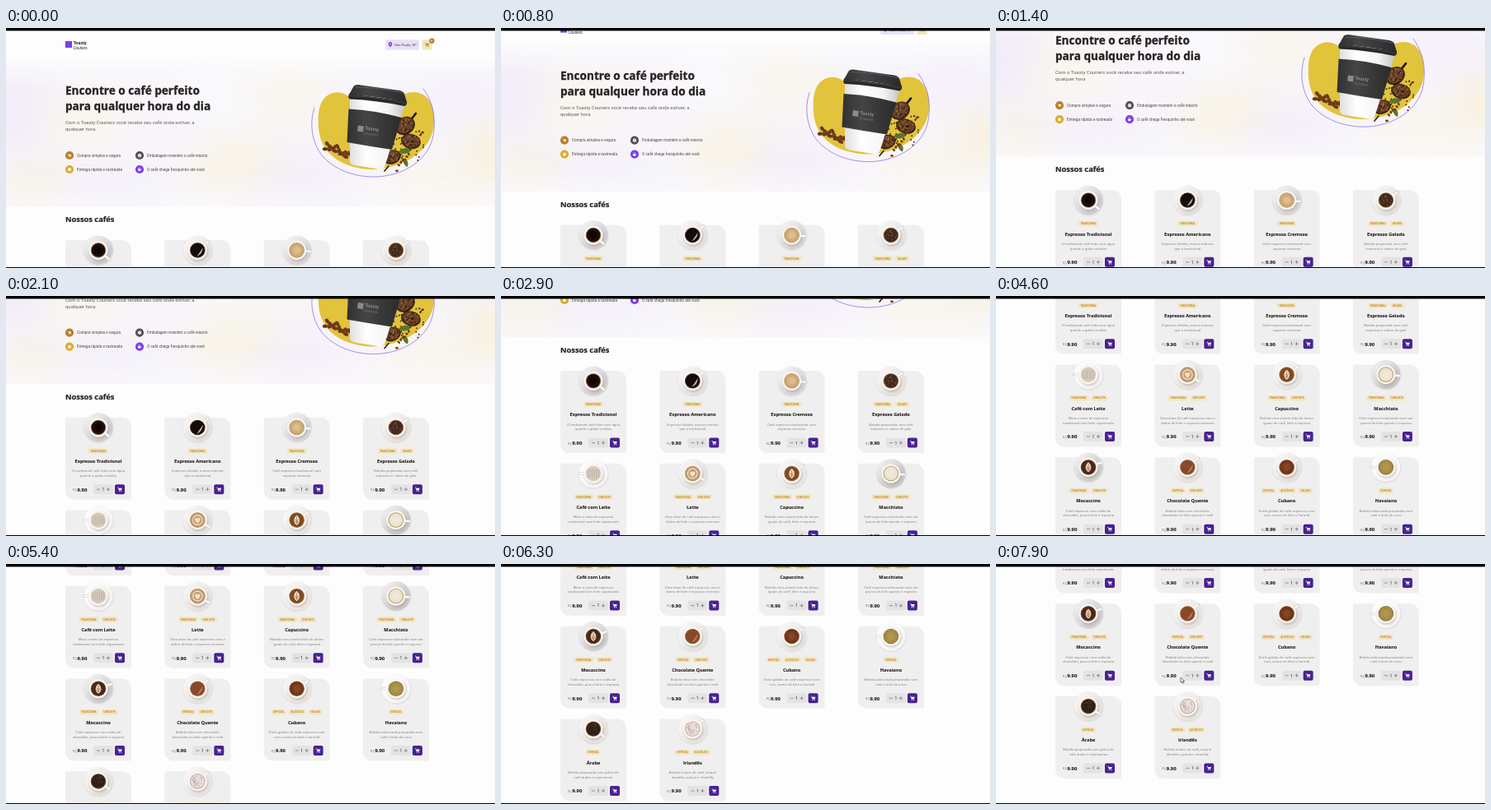
These frames come from a looping animation (593x292 px, 8000 ms). An HTML page:

```html
<!DOCTYPE html>
<html lang="pt-BR">
<head>
<meta charset="utf-8">
<style>
html, body { margin: 0; width: 100%; height: 100%; overflow: hidden; background: #fdfdfd; }
svg { display: block; width: 100vw; height: 100vh; }
text { font-family: Roboto, sans-serif; }
.h { font-family: "Open Sans", "Noto Sans", sans-serif; font-weight: 700; stroke: #272221; stroke-width: .022em; stroke-linejoin: round; }
.b { font-weight: 700; }
.m { text-anchor: middle; }
</style>
</head>
<body>
<svg id="stage" viewBox="0 0 593 292">
  <defs>
    <filter id="soft" x="-50%" y="-50%" width="200%" height="200%"><feGaussianBlur stdDeviation="22"/></filter>
    <filter id="shade" x="-50%" y="-50%" width="200%" height="200%"><feGaussianBlur stdDeviation="1"/></filter>
    <clipPath id="heroBox"><rect y="38" width="593" height="179"/></clipPath>
    <linearGradient id="fade" x2="0" y2="1">
      <stop offset="0" stop-color="#fdfdfd" stop-opacity=".7"/><stop offset=".2" stop-color="#fdfdfd" stop-opacity="0"/>
      <stop offset=".75" stop-color="#fdfdfd" stop-opacity="0"/><stop offset="1" stop-color="#fdfdfd" stop-opacity=".4"/>
    </linearGradient>
    <linearGradient id="paper">
      <stop offset="0" stop-color="#dfdfe0"/><stop offset=".3" stop-color="#fff"/>
      <stop offset=".7" stop-color="#f4f4f5"/><stop offset="1" stop-color="#c4c3c4"/>
    </linearGradient>
    <linearGradient id="dark">
      <stop offset="0" stop-color="#313132"/><stop offset=".35" stop-color="#454546"/><stop offset="1" stop-color="#2a2a2b"/>
    </linearGradient>
    <linearGradient id="gloss" x2="1" y2="1">
      <stop offset=".1" stop-color="#fff" stop-opacity=".75"/><stop offset=".7" stop-color="#fff" stop-opacity="0"/>
    </linearGradient>
    <g id="cart">
      <path d="M-2.9-2.3h1.1l.9 3.2h2.9" fill="none" stroke="currentColor" stroke-width=".6"/>
      <path d="M-1.6-1.6h4.4l-.8 2.2h-3z" fill="currentColor"/>
      <circle cx="-.6" cy="2" r=".6" fill="currentColor"/><circle cx="1.7" cy="2" r=".6" fill="currentColor"/>
    </g>
  </defs>
  <g id="page"></g>
  <path id="cursor" d="M0 0V6.2L1.5 4.9 2.5 7.1 3.5 6.7 2.6 4.6H4.6Z" fill="#fff" stroke="#222" stroke-width=".6"/>
  <rect width="593" height="3.4"/>
  <rect y="291" width="593" height="1"/>
</svg>
<script>
const page = document.getElementById('page'), cursor = document.getElementById('cursor');
const INK = '#272221', GREY = '#8d8686', PURPLE = '#7a3fee', DEEP = '#472292', GOLD = '#c08a2e', CREAM = '#f1e6c2';

let seed = 7;
const rnd = () => (seed = seed * 16807 % 2147483647) / 2147483647;
const repeat = (n, fn) => Array.from({ length: n }, (_, i) => fn(i)).join('');
const text = (x, y, size, fill, str, cls = '') =>
  `<text x="${x}" y="${y}" font-size="${size}" fill="${fill}" class="${cls}">${str}</text>`;
const rect = (x, y, w, h, r, fill) => `<rect x="${x}" y="${y}" width="${w}" height="${h}" rx="${r}" fill="${fill}"/>`;
const circle = (x, y, r, fill, more = '') => `<circle cx="${x}" cy="${y}" r="${r}" fill="${fill}" ${more}/>`;
const oval = (x, y, rx, ry, turn, fill) =>
  `<ellipse rx="${rx}" ry="${ry}" transform="translate(${x} ${y}) rotate(${turn})" fill="${fill}"/>`;
const path = (d, fill, more = '') => `<path d="${d}" fill="${fill}" ${more}/>`;
const line = (d, color, w) => path(d, 'none', `stroke="${color}" stroke-width="${w}" stroke-linecap="round"`);
const cart = (x, y, color, k = 1) => `<use href="#cart" transform="translate(${x} ${y}) scale(${k})" color="${color}"/>`;
// n dots strewn evenly over an ellipse
const specks = (n, x, y, rx, ry, r, color) => repeat(n, () => {
  const a = rnd() * 6.28, d = Math.sqrt(rnd());
  return circle(x + Math.cos(a) * d * rx, y + Math.sin(a) * d * ry, r, color);
});

function header() {
  return rect(72, 16, 8, 8, 0, PURPLE) +
    text(81.5, 20, 5.5, INK, 'Toasty', 'b') + text(81.5, 25.6, 4.6, INK, 'Couriers') +
    rect(460, 14.3, 41, 12.2, 2, '#e8e1f6') +
    path('M466 23.2C464.6 21.6 463.7 20.5 463.7 19.4A2.3 2.3 0 0 1 468.3 19.4C468.3 20.5 467.4 21.6 466 23.2Z', PURPLE) +
    circle(466, 19.4, .8, '#ebe5f9') + text(471, 22, 4.375, '#463865', 'São Paulo, SP') +
    rect(504.5, 14.3, 12.2, 12.2, 2, CREAM) + cart(510.4, 20.4, GOLD) +
    circle(516.4, 15.7, 3.1, '#b17a24') + text(516.4, 17.1, 3.8, '#fff', '0', 'b m');
}

function backdrop() {
  const glow = [
    [10, 100, 50, 45, '#f1ebf9'], [35, 190, 45, 25, '#f7f1e2'], [90, 110, 50, 30, '#faf6ea'],
    [120, 195, 60, 22, '#f3eefa'], [285, 170, 60, 35, '#f9f4e2'], [250, 85, 60, 30, '#faf9fc'],
    [345, 80, 50, 30, '#faf6ea'], [350, 190, 60, 25, '#f3edfa'], [550, 80, 50, 30, '#f5f0fb'],
    [590, 150, 35, 35, '#f8f1dc'], [520, 190, 60, 25, '#faf6e8']];
  return '<g clip-path="url(#heroBox)">' + rect(0, 38, 593, 180, 0, '#f8f5fb') + '<g filter="url(#soft)">' +
    glow.map(([x, y, rx, ry, c]) => oval(x, y, rx, ry, 0, c)).join('') +
    '</g>' + rect(0, 38, 593, 180, 0, 'url(#fade)') + '</g>';
}

function benefits() {
  const w = '#fff';
  return [
    [77, 155, '#b9802b', 'Compra simples e segura', cart(77, 155.2, w, .75)],
    [162, 155, '#574f4d', 'Embalagem mantém o café intacto',
      path('M162 152.7l2.1 1.1v2.5l-2.1 1.1-2.1-1.1v-2.5z', w) + line('M160.2 154l1.8 1 1.8-1M162 155v2', '#574f4d', .35)],
    [77, 172, '#dbac2c', 'Entrega rápida e rastreada', circle(77, 172.1, 2, w) + line('M77 171v1.2h.8', '#dbac2c', .4)],
    [162, 172, PURPLE, 'O café chega fresquinho até você',
      path('M160 171.3h3.4v1.3a1.5 1.5 0 0 1-3.4 0z', w) + line('M163.5 171.6q1.2.6 0 1.4M161 170.4v-.7M162.3 170.4v-.7', w, .4)]
  ].map(([x, y, c, label, icon]) => circle(x, y, 5.1, c) + icon + text(x + 9, y + 1.6, 4.72, '#4c4543', label)).join('');
}

const bean = (x, y, turn, k = 1) => oval(x, y, 3.2 * k, 2.2 * k, turn, '#7b4420') +
  `<path d="M-2.4 0Q0-1 2.4 0" transform="translate(${x} ${y}) rotate(${turn}) scale(${k})" fill="none" stroke="#33180a" stroke-width=".7"/>`;

const bowl = (x, y, rx, ry, turn) => oval(x, y, rx, ry, turn, '#33221a') + oval(x, y - .5, rx - 1.5, ry - 1.5, turn, '#6b4227') +
  specks(26, x, y - .5, rx - 2.5, ry - 2.5, .8, '#2f190d') + specks(16, x, y - .5, rx - 2.5, ry - 2.5, .8, '#a0714a');

function artwork() {
  return path('M384 88C390 79 402 75 412 81C424 88 440 100 456 96C472 91 478 78 495 78C513 79 520 96 519 116C518 146 486 171 444 172C409 171 381 154 379 121C378 108 379 96 384 88Z', '#e2c33c') +
    line('M374 97C368 115 370 139 384 156C399 173 424 182 450 181C485 179 513 159 518 131C522 108 517 89 506 74', '#8560dd', .7) +
    repeat(22, i => bean(387 + i * 1.6 + rnd() * 3, 138 + i * .7 + rnd() * 10, i * 53)) +
    specks(40, 487, 142, 20, 26, 1, '#4a2b18') +
    line('M486 118L497 104', '#1f1510', 2.6) +
    path('M476 151q7-8 16-3q-6 8-16 3zM481 158q0 9 6 11q3-8-6-11z', '#58752f') +
    bowl(484, 119, 12.5, 10.5, -35) + bowl(491, 138, 12, 9, 15) +
    bowl(468, 157, 11, 8.5, -20) + line('M464 168L459 174', '#2a1a12', 1.6) +
    repeat(14, i => bean(474 + i * 2.4, 170 - i * 3.4 + rnd() * 4, i * 41, .6)) +
    // paper cup
    path('M417 85L484 93L459 169Q456 173 448 171L423 167Q417 166 417 162Z', 'url(#paper)') +
    path('M415.5 98.5Q447 100 479.5 109L468 148Q441 144 413.5 139Z', 'url(#dark)') +
    path('M416 80Q414 85 417 86.5Q450 88 483 95Q487 94 486 89Z', '#29292a') +
    path('M421 72Q422 69 427 69L477 76Q482 77 483 80L486 90Q450 83 416 81Z', 'url(#dark)') +
    line('M424 72Q452 72 481 79', '#6a6a6b', .7) + line('M417 82.5Q452 84 485 91.5', '#58585a', .6) +
    `<g transform="translate(427 118.5) rotate(8)">` + rect(0, 0, 7, 7, 0, '#8b8b8c') +
    text(8.5, 3.8, 5.8, '#8b8b8c', 'Toasty', 'b') + text(8.5, 9.8, 4.7, '#79797a', 'Couriers') + '</g>';
}

// name, tags, description, [saucer, rim, drink, detail colour, detail kind, handle angle]
const T = 'TRADICIONAL', L = 'COM LEITE', E = 'ESPECIAL', A = 'ALCOÓLICO', G = 'GELADO';
const tagWidth = { [T]: 24.5, [L]: 20.5, [E]: 18.5, [A]: 21.5, [G]: 17.5 };
const drinks = [
  ['Expresso Tradicional', [T], 'O tradicional café feito com água|quente e grãos moídos', ['#cfcdd0', '#a87f5c', '#20100a', '#000', 'spot', 40]],
  ['Expresso Americano', [T], 'Expresso diluído, menos intenso|que o tradicional', ['#e6e1dd', '#54382a', '#150b08', '#b5b0ad', 'shine', -40]],
  ['Expresso Cremoso', [T], 'Café expresso tradicional com|espuma cremosa', ['#d6d4d4', '#c19a68', '#cda772', '#e7cda2', 'spot', 5]],
  ['Expresso Gelado', [T, G], 'Bebida preparada com café|expresso e cubos de gelo', ['#e6e1dc', '#9c7148', '#42291b', '#806550', 'dots', -35]],
  ['Café com Leite', [T, L], 'Meio a meio de expresso|tradicional com leite vaporizado', ['#f6f5f4', '#d9d0c3', '#d5cabb', '#b9ab98', 'bars', 180]],
  ['Latte', [T, L], 'Uma dose de café expresso com o|dobro de leite e espuma cremosa', ['#e6e2de', '#b88b5d', '#c69d70', '#f0e2ce', 'heart', 30]],
  ['Capuccino', [T, L], 'Bebida com canela feita de doses|iguais de café, leite e espuma', ['#ebe7e3', '#9c6d43', '#81491f', '#f5e8d6', 'leaf', -35]],
  ['Macchiato', [T, L], 'Café expresso misturado com um|pouco de leite quente e espuma', ['#c9c6c3', '#b29a61', '#ece1cf', '#f4ede0', 'spot', 5]],
  ['Mocaccino', [T, L], 'Café expresso com calda de|chocolate, pouco leite e espuma', ['#cfcdcf', '#6f4a34', '#4b2818', '#eadccb', 'leaf', -20]],
  ['Chocolate Quente', [E, L], 'Bebida feita com chocolate|dissolvido no leite quente e café', ['#e8e4e0', '#a56a43', '#87492a', '#b77c58', 'shine', -40]],
  ['Cubano', [E, A, G], 'Drink gelado de café expresso com|rum, creme de leite e hortelã', ['#e8e3df', '#96552f', '#6d351b', '#94532f', 'spot', -35]],
  ['Havaiano', [E], 'Bebida adocicada preparada com|café e leite de coco', ['#f8f7f5', '#8e773a', '#a58b43', '#b7a05c', 'spot', 180]],
  ['Árabe', [E], 'Bebida preparada com grãos de|café árabe e especiarias', ['#e6e2dd', '#7e5c3d', '#302015', '#5d422c', 'dots', 35]],
  ['Irlandês', [E, A], 'Bebida a base de café, uísque|irlandês, açúcar e chantilly', ['#e9e5e2', '#c5a48e', '#e7dcdc', '#a37d79', 'dots', -40]]
];

function detail(kind, c) {
  switch (kind) {
    case 'spot': return circle(0, 0, 5, c, 'opacity=".6" filter="url(#shade)"');
    case 'shine': return path('M-1 7.5Q6 5 6.5-3.5Q3 2-1 7.5Z', c);
    case 'bars': return repeat(6, i => line(`M${i * 2.6 - 6.5}-5v10`, c, .7));
    case 'heart': return circle(0, 0, 5.8, 'none', `stroke="${c}" stroke-width="1.2"`) + path('M0 4C-6-1-2-4 0-2C2-4 6-1 0 4Z', c);
    case 'leaf': return path('M0 6C-5 3-4-3 0-6C4-3 5 3 0 6Z', c) + line('M0-4v8M-2.4-1L0 1.5 2.4-1M-2.2 1.5L0 4 2.2 1.5', '#8a5933', .7);
    default: return specks(22, 0, 0, 7.2, 7.2, .55, c);
  }
}

function cup([saucer, rim, drink, color, kind, angle]) {
  return circle(.4, .8, 17.4, '#9a9592', 'opacity=".35" filter="url(#shade)"') +
    circle(0, 0, 17.5, saucer) + circle(0, 0, 17.5, 'url(#gloss)') +
    circle(1, 1.6, 12, '#7d7672', 'opacity=".3" filter="url(#shade)"') +
    `<path d="M10 0H17" transform="rotate(${angle})" stroke="#c9c5c1" stroke-width="3.2" stroke-linecap="round"/>` +
    `<path d="M10 0H16.8" transform="rotate(${angle})" stroke="#fdfcfb" stroke-width="2.2" stroke-linecap="round"/>` +
    circle(0, 0, 11.6, '#f8f6f4') + circle(0, 0, 9.3, rim) + circle(0, 0, 8.4, drink) + detail(kind, color);
}

function tags(list) {
  let x = 40 - (list.reduce((sum, t) => sum + tagWidth[t], 0) + 2.5 * (list.length - 1)) / 2;
  return list.map(t => {
    const w = tagWidth[t], out = rect(x, 37.5, w, 6.5, 3.25, CREAM) + text(x + w / 2, 41.8, 2.95, GOLD, t, 'b m');
    x += w + 2.5;
    return out;
  }).join('');
}

function card([name, list, about, look], i) {
  const x = 72 + i % 4 * 120.3, y = 258.2 + Math.floor(i / 4) * 112.7;
  return `<g transform="translate(${x} ${y})">` +
    path('M2 0H69A11 11 0 0 1 80 11V98A2 2 0 0 1 78 100H11A11 11 0 0 1 0 89V2A2 2 0 0 1 2 0Z', '#f0efef') +
    `<g transform="translate(40 12.2)">${cup(look)}</g>` + tags(list) +
    text(40, 55.3, 5.6, INK, name, 'h m') +
    about.split('|').map((s, k) => text(40, 66.6 + k * 5.7, 4.375, GREY, s, 'm')).join('') +
    text(8.8, 89.4, 4.375, GREY, 'R$') + text(14.5, 89.8, 5.9, INK, '9.90', 'h') +
    rect(34, 81.5, 24, 12, 2, '#e4e3e3') + line('M38.3 87.5h3.4M50.3 87.5h3.4M52 85.8v3.4', '#5d5278', .6) +
    text(45.9, 89.4, 5, INK, '1', 'm') +
    rect(60, 81.5, 12, 12, 2, DEEP) + cart(66, 87.6, '#fff') + '</g>';
}

page.innerHTML = header() + backdrop() +
  text(72, 81, 13.6, INK, 'Encontre o café perfeito', 'h') + text(72, 100.3, 13.6, INK, 'para qualquer hora do dia', 'h') +
  text(72, 117, 5.95, '#655d5b', 'Com o Toasty Couriers você recebe seu café onde estiver, a') +
  text(72, 125.1, 5.95, '#655d5b', 'qualquer hora') +
  benefits() + artwork() + text(72, 236.3, 9.3, INK, 'Nossos cafés', 'h') + drinks.map(card).join('');

// distance covered when speed rises evenly from 0 to 1 between a and b
const ramp = (t, a, b) => t <= a ? 0 : t < b ? (t - a) ** 2 / (2 * (b - a)) : t - (a + b) / 2;
const scroll = t => .0708 * (ramp(t, 400, 680) - ramp(t, 6580, 6800));

const trail = [[7300, 600, 60], [7600, 376, 88], [7700, 318, 108], [7800, 252, 132], [7900, 224, 138]];
function pointer(t) {
  const i = trail.findIndex(p => p[0] >= t);
  if (i < 1) return [620, 60];
  const [t0, x0, y0] = trail[i - 1], [t1, x1, y1] = trail[i], k = (t - t0) / (t1 - t0);
  return [x0 + (x1 - x0) * k, y0 + (y1 - y0) * k];
}

function draw(now) {
  const t = Math.floor(now % 8000 / 100) * 100;
  page.setAttribute('transform', `translate(0 ${-scroll(t)})`);
  cursor.setAttribute('transform', `translate(${pointer(t)})`);
  requestAnimationFrame(draw);
}
draw(0);
</script>
</body>
</html>
```
